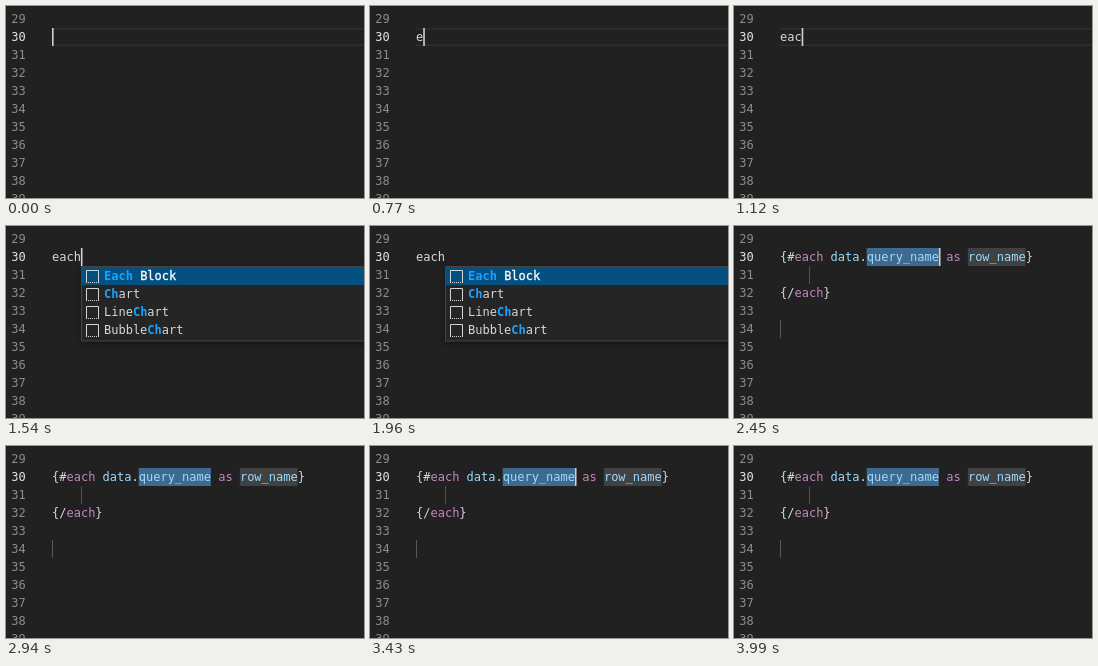
These frames come from a looping animation (358 by 192 pixels, 4130 ms). An HTML page:

```html
<!DOCTYPE html>
<html lang="en">
<head>
<meta charset="utf-8">
<title>Snippet completion</title>
<style>
  html, body { margin: 0; width: 100%; height: 100%; overflow: hidden; background: #212121; }
  svg { display: block; width: 100vw; height: 100vh; }
  text { font: 12px "DejaVu Sans Mono", monospace; fill: #d8d8d8; white-space: pre; }
  .number { fill: #8c8c8c; }
  .active { fill: #e2e2e2; }
  .keyword { fill: #c586c0; }
  .variable { fill: #9cdcfe; }
  .match { fill: #18a3ff; font-weight: bold; }
  .chosen { fill: #fff; stroke: #fff; stroke-width: .3px; }
  .chosen .match { stroke: none; }
  .panel { filter: drop-shadow(0 2px 3px rgba(0, 0, 0, .4)); }
</style>
</head>
<body>
<svg id="stage" viewBox="0 0 358 192"></svg>
<script>
const LOOP = 4130;
const LEFT = 46, CHAR = 7.224, LINE = 18, FIRST = 29;
const stage = document.getElementById('stage');

// start time, view, typed characters, caret column (null = blinked off)
const steps = [
  [0, 'typing', 0, 0],
  [490, 'typing', 0, null],
  [770, 'typing', 1, 1],
  [910, 'typing', 2, 2],
  [1120, 'typing', 3, 3],
  [1540, 'menu', 4, 4],
  [1960, 'menu', 4, null],
  [2450, 'snippet', 0, 22],
  [2940, 'snippet', 0, null],
  [3430, 'snippet', 0, 22],
  [3990, 'snippet', 0, null],
];

const lineTop = line => 4 + (line - FIRST) * LINE;
const baseline = line => lineTop(line) + 13.2;
const column = n => LEFT + n * CHAR;

function add(parent, tag, attrs = {}) {
  const el = document.createElementNS('http://www.w3.org/2000/svg', tag);
  for (const key in attrs) el.setAttribute(key, attrs[key]);
  return parent.appendChild(el);
}

const rect = (parent, x, y, width, height, fill) =>
  add(parent, 'rect', { x, y, width, height, fill });

// spans are [string, class] pairs
function write(parent, x, y, spans, className = '') {
  const text = add(parent, 'text', { x, y, class: className });
  for (const [string, kind = ''] of spans)
    add(text, 'tspan', { class: kind }).textContent = string;
  return text;
}

for (let line = FIRST; line <= 39; line++)
  write(stage, 5.3, baseline(line), [[String(line)]], line === 30 ? 'active' : 'number');

const highlight = add(stage, 'g');
rect(highlight, LEFT, 22, 358 - LEFT, 1.5, '#2e2e2e');
rect(highlight, LEFT, 38.5, 358 - LEFT, 1.5, '#2e2e2e');

const typed = write(stage, LEFT, baseline(30), []);

const menu = add(stage, 'g');
add(menu, 'rect', { x: 75.5, y: 40.5, width: 300, height: 74.5,
  fill: '#252526', stroke: '#454545', class: 'panel' });
rect(menu, 76, 41, 300, LINE, '#045080');
[
  [['Each', 'match'], [' Block']],
  [['Ch', 'match'], ['art']],
  [['Line'], ['Ch', 'match'], ['art']],
  [['Bubble'], ['Ch', 'match'], ['art']],
].forEach((label, i) => {
  const y = 41 + i * LINE;
  const icon = { fill: 'none', stroke: '#d4d4d4' };
  add(menu, 'path', { ...icon, d: `M80.5 ${y + 15}V${y + 3.5}H92.5V${y + 15}` });
  add(menu, 'path', { ...icon, d: `M80 ${y + 15.5}H93`, 'stroke-dasharray': '1 1' });
  write(menu, 98, y + 13.2, label, i ? '' : 'chosen');
});

const snippet = add(stage, 'g');
rect(snippet, column(12), 22, 10 * CHAR, LINE, '#3f6a90');
rect(snippet, column(26), 22, 8 * CHAR, LINE, '#414141');
rect(snippet, 75, lineTop(31), 1, LINE, '#505050');
rect(snippet, 46, lineTop(34), 1, LINE, '#585858');
write(snippet, LEFT, baseline(30), [
  ['{#'], ['each', 'keyword'], [' '], ['data', 'variable'], ['.'],
  ['query_name', 'variable'], [' '], ['as', 'keyword'], [' '],
  ['row_name', 'variable'], ['}'],
]);
write(snippet, LEFT, baseline(32), [['{/'], ['each', 'keyword'], ['}']]);

const caret = rect(stage, 0, 22, 1.6, LINE, '#d0d0d0');

const show = (el, visible) => el.setAttribute('visibility', visible ? 'visible' : 'hidden');

const start = performance.now();
let current;

function frame(now) {
  const time = Math.max(0, now - start) % LOOP;
  const step = steps.findLast(([at]) => at <= time);
  if (step !== current) {
    current = step;
    const [, view, count, caretColumn] = step;
    show(highlight, view === 'typing');
    show(menu, view === 'menu');
    show(snippet, view === 'snippet');
    typed.textContent = 'each'.slice(0, count);
    show(caret, caretColumn !== null);
    if (caretColumn !== null) caret.setAttribute('x', column(caretColumn));
  }
  requestAnimationFrame(frame);
}
frame(start);
</script>
</body>
</html>
```
